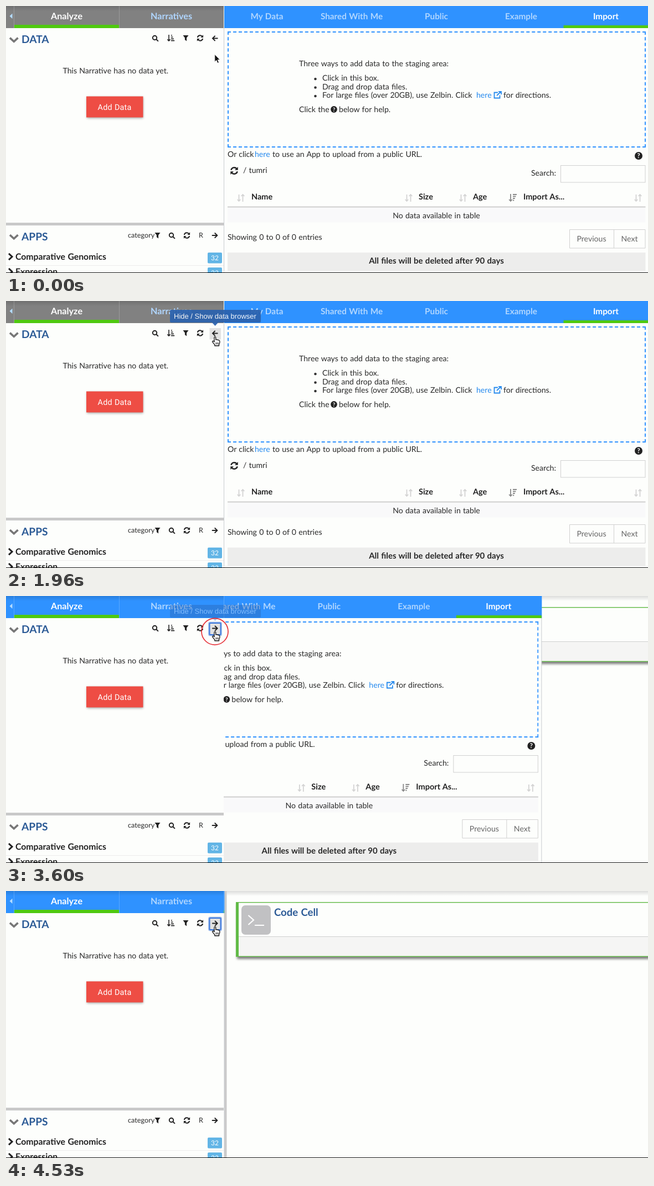
An HTML page that plays this animation: 1159x483 px, repeating every 4.66 s.

```html
<!DOCTYPE html>
<html lang="en">
<head>
<meta charset="utf-8">
<title>Hide and show the data browser</title>
<style>
  html, body { margin: 0; width: 100%; height: 100%; overflow: hidden; background: #fdfefc; }
  svg { display: block; text-rendering: geometricPrecision; }
  text { font: 14.1px Lato, sans-serif; word-spacing: .6px; fill: #292929; white-space: pre; }
  .mid { text-anchor: middle; }
  .bold { font-weight: bold; }
  .tab { font-size: 15.3px; font-weight: bold; text-anchor: middle; fill: #b0d6ff; }
  .side { font-size: 16.2px; }
  .on { fill: #fff; }
  .title { font-size: 19.2px; font-weight: bold; fill: #2b5a96; }
  .app { font-size: 15.8px; font-weight: bold; fill: #222; }
  .col { font-size: 14.5px; font-weight: bold; fill: #222; }
  .link { fill: #2489ee; }
  .soft { fill: #666; }
  .count { font-size: 12px; fill: #fff; text-anchor: middle; }
  .line { fill: none; stroke: #222; stroke-width: 2; }
  .pale { fill: none; stroke: #d0d0d0; }
  .drop { box-sizing: border-box; height: 100%; border: 2px dashed #2f92ff; }
</style>
</head>
<body>
<svg width="1159" height="483" viewBox="0 0 1159 483">
  <defs>
    <g id="search" class="line"><circle cx="-1" cy="-1" r="3.7"/><path d="M1.8 1.8L5.4 5.4"/></g>
    <g id="refresh">
      <path class="line" d="M-4.7-1A4.8 4.8 0 0 1 3.6-3.2M4.7 1A4.8 4.8 0 0 1-3.6 3.2"/>
      <path fill="#222" d="M5.6-5.8V-1H.8ZM-5.6 5.8V1H-.8Z"/>
    </g>
    <path id="funnel" fill="#222" d="M-5-5H5L1.6-.5V5.5L-1.6 3V-.5Z"/>
    <path id="arrow" class="line" d="M5.2 0H-4M.3-4.6L-4.3 0L.3 4.6"/>
    <path id="sortUp" class="line" style="stroke-width:1.6" d="M-4-6V5M-6.6 2.4L-4 5L-1.4 2.4M0-5H2M0-1.8H3.4M0 1.4H4.8M0 4.6H6.2"/>
    <path id="sortDown" fill="none" stroke="#888" stroke-width="1.8" d="M-4-7V6M-6.8 3L-4 6L-1.2 3M0-6H7M0-2.5H5.4M0 1H3.8M0 4.5H2.2"/>
    <path id="sortNone" fill="none" stroke="#d3d3d3" stroke-width="1.8" d="M-3.5-6V6M-6.3 3L-3.5 6L-.7 3M3.5 7V-6M.7-3L3.5-6L6.3-3"/>
    <path id="down" fill="none" stroke="#777" stroke-width="3.6" d="M-7.3-3.4L0 3.4L7.3-3.4"/>
    <path id="next" fill="none" stroke="#222" stroke-width="3" d="M-3-5.6L3 0L-3 5.6"/>
    <g id="help"><circle r="7" fill="#222"/><text class="mid bold" y="4.2" style="font-size:12px;fill:#fff">?</text></g>
    <linearGradient id="shade" x2="0" y2="1">
      <stop stop-opacity=".13"/><stop offset="1" stop-opacity="0"/>
    </linearGradient>
    <filter id="blur" x="-20%" y="-40%" width="140%" height="180%"><feGaussianBlur stdDeviation="2"/></filter>
  </defs>

  <!-- Notebook page -->
  <rect width="1159" height="483" fill="#fdfefc"/>
  <rect x="417" y="24" width="760" height="99" opacity=".5" filter="url(#blur)"/>
  <rect x="415" y="20" width="760" height="99" fill="#61bb46"/>
  <rect x="420" y="21.4" width="760" height="96" fill="#fdfefc"/>
  <rect x="420" y="82" width="760" height="35.4" fill="#f5f5f4"/>
  <path class="pale" d="M420 82.5H1159"/>
  <rect x="425" y="26" width="53" height="53" rx="7" fill="#c1c1c3"/>
  <path fill="none" stroke="#fff" stroke-width="2.2" d="M437.5 44L447 52.5L437.5 61M449 62H466"/>
  <text class="title" style="font-size:18.6px" x="484" y="45">Code Cell</text>
  <rect x="393" width="766" height="9" fill="url(#shade)"/>
  <rect x="393" width="5.5" height="483" fill="#cbcbcb"/>

  <!-- Sliding data browser -->
  <g id="browser">
    <rect x="393" width="767.5" height="483" fill="#fdfefc"/>
    <path stroke="#c8ccd0" d="M393.5 40V483M1160.5 40V483"/>
    <rect x="394" width="767" height="40" fill="#2f92ff"/>
    <rect x="1006.5" y="35" width="154" height="5" fill="#4fc910"/>
    <text class="tab" x="471" y="24">My Data</text>
    <text class="tab" x="624" y="24">Shared With Me</text>
    <text class="tab" x="777" y="24">Public</text>
    <text class="tab" x="930" y="24">Example</text>
    <text class="tab on" x="1083" y="24">Import</text>

    <foreignObject x="400" y="46" width="755" height="210"><div class="drop"></div></foreignObject>
    <text x="529" y="109">Three ways to add data to the staging area:</text>
    <g fill="#333"><circle cx="558.5" cy="132" r="2.3"/><circle cx="558.5" cy="147.5" r="2.3"/><circle cx="558.5" cy="163" r="2.3"/></g>
    <text x="571" y="135">Click in this box.</text>
    <text x="571" y="150.5">Drag and drop data files.</text>
    <text x="571" y="166">For large files (over 20GB), use Zelbin. Click</text>
    <text class="link" x="849" y="166">here</text>
    <path fill="none" stroke="#2489ee" stroke-width="1.8" d="M888 156.500H881.5V166.5H891.5V161.5M886 162L894 154.5M889 154.9H894V160"/>
    <text x="898" y="166">for directions.</text>
    <text x="529" y="192">Click the</text>
    <use href="#help" transform="translate(592 187) scale(.84)"/>
    <text x="601" y="192">below for help.</text>

    <text x="400" y="273">Or click</text>
    <text class="link" x="449" y="273">here</text>
    <text x="481" y="273">to use an App to upload from a public URL.</text>
    <use href="#help" x="1142" y="271"/>
    <use href="#refresh" transform="translate(412 298) scale(1.2)"/>
    <text x="428" y="302">/ tumri</text>
    <text x="948" y="307">Search:</text>
    <rect class="pale" x="1001.5" y="288.5" width="152.5" height="30.5"/>

    <g id="columns"></g>
    <rect x="400" y="364" width="754.5" height="27.5" fill="#f9f9fa"/>
    <path stroke="#cfcfcf" stroke-width="2" d="M400 363.5H1154.5"/>
    <text class="mid" x="777" y="384">No data available in table</text>
    <text x="400" y="422.5">Showing 0 to 0 of 0 entries</text>
    <path class="pale" d="M1017.5 404.5H1154V438H1017.5ZM1097.5 404.5V438"/>
    <text class="mid soft" x="1057" y="425.5">Previous</text>
    <text class="mid soft" x="1125.5" y="425.5">Next</text>
    <rect x="400" y="446" width="754.5" height="33" fill="#ededec"/>
    <text class="mid bold" style="font-size:15px" x="777" y="466">All files will be deleted after 90 days</text>
  </g>

  <!-- Left panel -->
  <rect width="393" height="483" fill="#fdfefc"/>
  <rect id="header" width="393" height="40"/>
  <rect width="393" height="9" fill="url(#shade)"/>
  <path stroke="#fff" opacity=".2" d="M14.5 0V40M204.5 0V40M393.5 0V40"/>
  <rect x="15" y="34" width="189" height="6" fill="#4fc910"/>
  <path fill="#b4dcff" d="M11.5 13.5V23L6.5 18.2Z"/>
  <text class="tab side on" x="109.5" y="24">Analyze</text>
  <text class="tab side" x="298.5" y="24">Narratives</text>

  <use href="#down" x="14.3" y="61"/>
  <text class="title" x="28" y="67">DATA</text>
  <use href="#search" x="269.5" y="58.5"/>
  <use href="#sortUp" x="298" y="58"/>
  <use href="#funnel" x="324.5" y="58"/>
  <use href="#refresh" x="350.5" y="58"/>
  <rect id="hover" x="367.5" y="49" width="20.5" height="20.5" fill="#e2e2e2"/>
  <g id="focus" fill="none" stroke="#3c78dc">
    <rect x="366.5" y="48" width="22" height="23" rx="2" stroke-width="3" opacity=".45"/>
    <rect x="367.5" y="49" width="20" height="21" rx="1" stroke-width="2"/>
  </g>
  <use id="toggle" href="#arrow"/>

  <text x="102.5" y="122">This Narrative has no data yet.</text>
  <rect x="146" y="165" width="101.5" height="38" opacity=".35" filter="url(#blur)"/>
  <rect x="145" y="163.5" width="102.5" height="38" fill="#ee4d44"/>
  <text class="mid" style="font:14.4px Roboto,sans-serif;fill:#fff;letter-spacing:.15px" x="196" y="187.5">Add Data</text>

  <rect y="392" width="393" height="5" fill="#c9c9c9"/>
  <use href="#down" x="14.3" y="417.5"/>
  <text class="title" x="28" y="423.5">APPS</text>
  <text style="font-size:12.7px" x="220" y="419">category</text>
  <use href="#funnel" x="273.5" y="415"/>
  <use href="#search" x="299.5" y="415.5"/>
  <use href="#refresh" x="326.5" y="415"/>
  <text class="mid" style="font-size:12.5px" x="352" y="419">R</text>
  <use href="#arrow" transform="translate(377 415) scale(-1 1)"/>
  <g id="apps"></g>

  <!-- Tooltip, click ring and pointer -->
  <g id="tooltip">
    <path fill="#2b62ae" d="M298 16H458Q460 16 460 18V37Q460 39 458 39H383L377.5 45L372 39H298Q296 39 296 37V18Q296 16 298 16Z"/>
    <text style="font:13px 'Liberation Sans',Arial,sans-serif;word-spacing:0;fill:#fff" x="303" y="32">Hide / Show data browser</text>
  </g>
  <circle id="ring" cx="377" cy="64.3" fill="none" stroke="#e5252c" stroke-width="1.7"/>
  <path id="pointer" fill="#111" stroke="#fff" stroke-width=".8" d="M0 0V13.5L3 10.7L5.2 15.8L7.6 14.8L5.4 9.8H9.4Z"/>
  <g id="hand" fill="#fff" stroke="#111" stroke-width="1.3" stroke-linejoin="round">
    <path d="M376 73V66Q376 64.6 377.3 64.6T378.7 66V70Q380.4 69 381.3 70.3Q383 69.6 383.7 71Q385.6 70.7 385.8 72.5V75.5L384.5 78.5V81H376.8V79L373 74.6Q372 72.8 373.5 72.3Q374.7 72 376 74Z"/>
    <path stroke-width=".9" d="M379 75V78.5M381 75V78.5M383 75V78.5"/>
  </g>
  <rect y="482" width="1159" height="1" fill="#111"/>
</svg>
<script>
const $ = id => document.getElementById(id);
const LOOP = 4660, PRESS = 3290, CLICK = 3542.5, SLIDE = 171.5, TRAVEL = 766.5, FRAME = 100 / 3;

$('columns').innerHTML = [[424, 'Name', 443], [727, 'Size', 745], [825, 'Age', 843],
  [915, 'Import As...', 934], [1141, '', 0]].map(([x, label, textX]) =>
  `<use href="#${x === 915 ? 'sortDown' : 'sortNone'}" x="${x}" y="347"/>
   <text class="col" x="${textX}" y="350">${label}</text>`).join('');

$('apps').innerHTML = [['Comparative Genomics', 32], ['Expression', 33]].map(([name, count], i) =>
  `<g transform="translate(0 ${i * 27})">
     <use href="#next" x="8" y="453.5"/><text class="app" x="17" y="459">${name}</text>
     <rect x="364" y="446" width="26" height="19.5" rx="2" fill="#62b5e6"/>
     <text class="count" x="377" y="459.5">${count}</text>
     <path stroke="#ececec" d="M0 469.5H393"/>
   </g>`).join('');

const progress = (t, start, length) => Math.min(1, Math.max(0, (t - start) / length));
const swing = p => 0.5 - Math.cos(Math.PI * p) / 2;
const show = (id, visible) => $(id).setAttribute('visibility', visible ? 'visible' : 'hidden');

function draw(t) {
  const clicked = t >= CLICK;
  const tipY = 87.5 - 23 * swing(progress(t, 600, 530));

  $('pointer').setAttribute('transform', `translate(376.8 ${tipY})`);
  show('pointer', t < 1199);
  show('hand', t >= 1199);
  show('hover', tipY < 69);
  show('focus', t >= PRESS);

  $('header').setAttribute('fill', clicked ? '#2f92ff' : '#818181');
  $('toggle').setAttribute('transform', `translate(377.3 58.5) scale(${clicked ? -1 : 1} 1)`);
  $('browser').setAttribute('transform', `translate(${-TRAVEL * swing(progress(t, CLICK, SLIDE))} 0)`);
  $('tooltip').setAttribute('opacity', 0.93 * (progress(t, 1780, 160) - progress(t, CLICK - 30, 150)));

  show('ring', t >= PRESS && t < 4530);
  $('ring').setAttribute('r', 24 + 0.0258 * (t - 3600));
  $('ring').setAttribute('opacity', 1 - progress(t, PRESS, 4530 - PRESS) ** 2);
}

const start = performance.now();
(function tick() {
  const t = (performance.now() - start) % LOOP;
  draw(Math.floor((t + 6.8) / FRAME) * FRAME);
  requestAnimationFrame(tick);
})();
</script>
</body>
</html>
```
